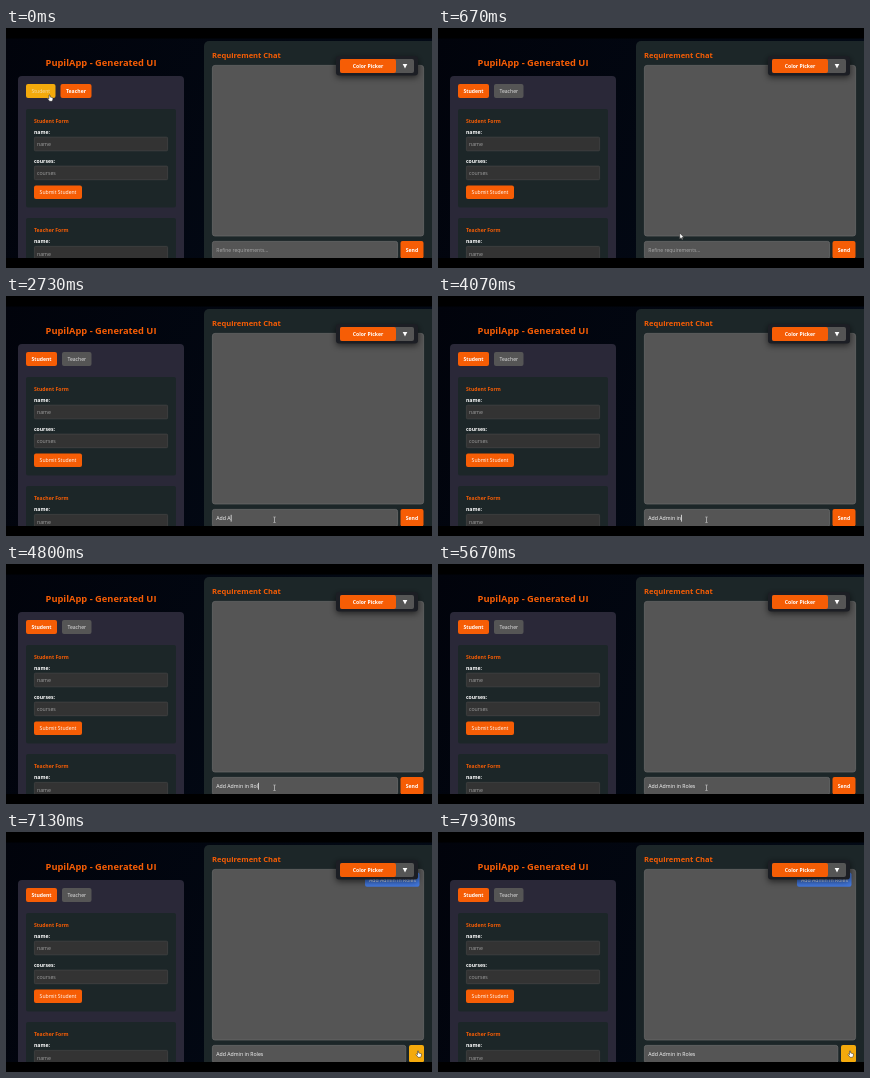
These frames come from a looping animation (426 by 240 pixels, 8000 ms). An HTML page with a canvas:

```html
<!DOCTYPE html>
<html lang="en">
<head>
<meta charset="utf-8">
<title>Generated UI</title>
<style>
html, body { margin: 0; width: 100%; height: 100%; overflow: hidden; background: #000; }
canvas { display: block; width: 426px; height: 240px; }
</style>
</head>
<body>
<canvas id="stage" width="426" height="240"></canvas>
<script>
const ctx = document.getElementById('stage').getContext('2d');
const LOOP = 8000;
const ORANGE = '#f65d05', YELLOW = '#f4aa0c', GREY = '#555555', CARD = '#1c2628';
const MESSAGE = 'Add Admin in Roles';
const SELECT = 100, FOCUS = 1650, TYPE = 1780, KEY = 188, SUBMIT = 6900;

// Pointer stops: time, x, y
const stops = [[0, 43, 67], [200, 43, 67], [800, 268.5, 223.5], [5750, 268.5, 223.5],
               [6350, 411.5, 219], [LOOP, 411.5, 219]];

function box(x, y, w, h, r, fill, stroke) {
  ctx.beginPath();
  ctx.roundRect(x, y, w, h, r);
  ctx.fillStyle = fill;
  ctx.fill();
  if (stroke) {
    ctx.strokeStyle = stroke;
    ctx.lineWidth = 0.7;
    ctx.stroke();
  }
}

function text(str, x, y, size, color, weight = 400, align = 'left') {
  ctx.font = `${weight} ${size}px "Open Sans", "Noto Sans", sans-serif`;
  ctx.textAlign = align;
  ctx.fillStyle = color;
  ctx.fillText(str, x, y);
}

function button(label, x, y, w, h, fill, weight = 700, color = '#fff') {
  box(x, y, w, h, 2, fill);
  text(label, x + w / 2, y + h / 2 + 1.9, 5.1, color, weight, 'center');
}

function field(label, y) {
  text(label + ':', 28, y, 5.1, '#fff', 700);
  box(28.4, y + 3.4, 133.2, 13.6, 1, '#333333', '#454545');
  text(label, 31, y + 12.5, 5.2, '#a0a0a0');
}

function pointerAt(t) {
  const i = stops.findIndex((s, k) => k && t < s[0]);
  const [t0, x0, y0] = stops[i - 1], [t1, x1, y1] = stops[i];
  const p = (t - t0) / (t1 - t0), e = p * p * (3 - 2 * p);
  return { x: x0 + (x1 - x0) * e, y: y0 + (y1 - y0) * e };
}

const inside = (p, x, y, w, h) => p.x >= x && p.x <= x + w && p.y >= y && p.y <= y + h;

function shape(points, x, y) {
  ctx.beginPath();
  points.forEach(([dx, dy]) => ctx.lineTo(x + dx, y + dy));
  ctx.closePath();
  ctx.fillStyle = '#fff';
  ctx.strokeStyle = '#222';
  ctx.lineWidth = 0.5;
  ctx.fill();
  ctx.stroke();
}

function drawPointer(p, kind) {
  if (kind === 'text') {
    ctx.fillStyle = '#bbb';
    ctx.fillRect(p.x - 0.4, p.y - 2.5, 0.8, 5.5);
    ctx.fillRect(p.x - 1.3, p.y - 2.8, 2.6, 0.6);
    ctx.fillRect(p.x - 1.3, p.y + 2.7, 2.6, 0.6);
  } else if (kind === 'hand') {
    shape([[0, 0], [1, 0], [1.2, 2], [4, 2.8], [3.8, 5], [3, 6.3], [0.6, 6.3], [-1.6, 3.6], [-1, 3], [0, 3.8]], p.x, p.y);
  } else {
    shape([[0, 0], [0, 6], [1.4, 4.8], [2.4, 6.8], [3.2, 6.4], [2.3, 4.5], [4.1, 4.3]], p.x, p.y);
  }
}

function drawForms(selected, hover) {
  text('PupilApp - Generated UI', 95, 38.2, 9.3, ORANGE, 700, 'center');
  box(12, 48, 166, 200, 4, '#2a2838');
  if (selected) {
    button('Student', 20, 56, 31, 14, hover ? YELLOW : ORANGE);
    button('Teacher', 56, 56, 29.5, 14, GREY, 400, '#e4e4e4');
  } else {
    button('Student', 20, 56, 29.5, 14, YELLOW, 400, '#f4e0b0');
    button('Teacher', 54.5, 56, 31, 14, ORANGE);
  }
  box(20, 81, 150, 98.5, 2, CARD);
  text('Student Form', 28, 94.8, 5.1, ORANGE, 700);
  field('name', 105.8);
  field('courses', 134.7);
  button('Submit Student', 28, 157.4, 48, 13.6, ORANGE, 400);
  box(20, 190, 150, 60, 2, CARD);
  text('Teacher Form', 28, 204.3, 5.1, ORANGE, 700);
  field('name', 215);
}

function drawChat(t, sendHover) {
  const sent = t >= SUBMIT;
  box(198, 13, 240, 240, 5, CARD);
  text('Requirement Chat', 206, 29.5, 7.55, ORANGE, 700);
  box(206.4, 37.4, 211.2, 170.6, 2.5, GREY, '#6a6a6a');
  if (sent) {
    box(359, 40.5, 54.5, 14.2, 2, '#4277dc');
    text(MESSAGE, 363, 49.8, 5.2, '#fff');
  }

  ctx.save();
  ctx.shadowColor = 'rgba(0,0,0,.6)';
  ctx.shadowBlur = 6;
  ctx.shadowOffsetY = 2;
  box(330, 28, 82, 19.5, 3, '#1c1e24');
  ctx.restore();
  box(334, 31, 74, 14, 2, GREY);
  button('Color Picker', 334, 31, 56, 14, ORANGE);
  ctx.beginPath();
  ctx.moveTo(396.7, 36);
  ctx.lineTo(401.3, 36);
  ctx.lineTo(399, 40.4);
  ctx.fillStyle = '#fff';
  ctx.fill();

  const typed = MESSAGE.slice(0, Math.max(0, Math.floor((t - TYPE) / KEY)));
  box(206.4, 213.4, sent ? 193.4 : 185.2, 17.2, 2, GREY, '#707070');
  text(typed || 'Refine requirements...', 210.3, 224, typed ? 5.2 : 5.05, typed ? '#fff' : '#a9a9a9');
  if (t >= FOCUS && t < 5530) {
    const x = 210.3 + (typed ? ctx.measureText(typed).width + 0.2 : 0);
    ctx.fillStyle = '#fff';
    ctx.fillRect(x, 218.8, 0.7, 6.8);
  }
  const fill = sendHover ? YELLOW : ORANGE;
  if (sent) box(403, 213, 15, 17.5, 2, fill);
  else button('Send', 394.5, 213, 23, 17.5, fill);
}

function draw(t) {
  const pointer = pointerAt(t);
  const tabHover = inside(pointer, 20, 56, 31, 14);
  const sendHover = inside(pointer, 394.5, 213, 23, 17);
  const inputHover = inside(pointer, 206, 213, 186, 17);

  const back = ctx.createLinearGradient(0, 10, 426, 230);
  back.addColorStop(0, '#01030b');
  back.addColorStop(1, '#030b18');
  ctx.fillStyle = back;
  ctx.fillRect(0, 0, 426, 240);
  drawForms(t >= SELECT, tabHover);
  drawChat(t, sendHover);
  drawPointer(pointer, inputHover ? 'text' : tabHover || sendHover ? 'hand' : 'arrow');

  ctx.fillStyle = '#000';
  ctx.fillRect(0, 0, 426, 10.5);
  ctx.fillRect(0, 230, 426, 10);
}

function tick() {
  draw(performance.now() % LOOP);
  requestAnimationFrame(tick);
}
tick();
</script>
</body>
</html>
```
